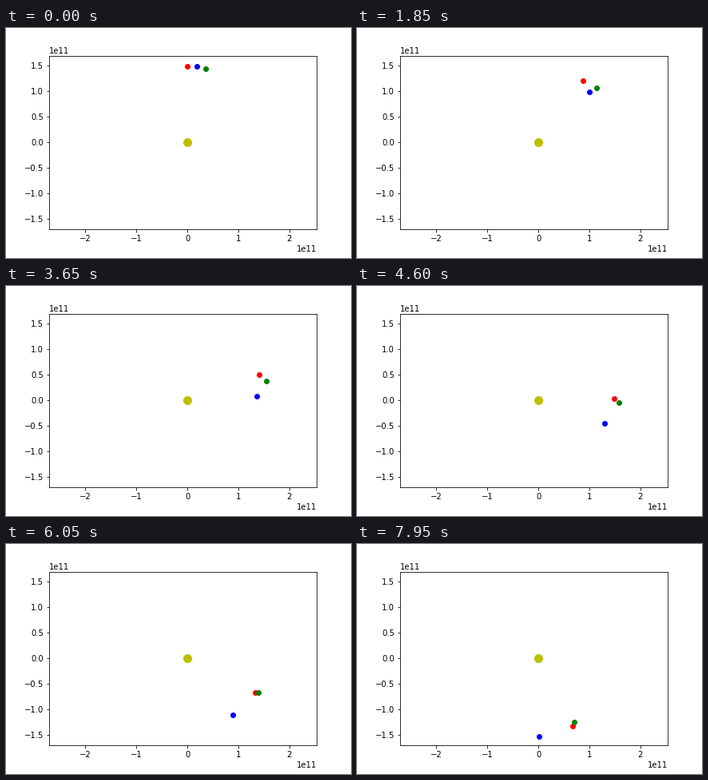
A matplotlib script for the animation above (8 s loop, 432x288 px).

```python
import numpy as np
import matplotlib.pyplot as plt
from matplotlib.animation import FuncAnimation
from matplotlib.ticker import MultipleLocator

plt.rcParams.update({
    "font.family": "DejaVu Sans",
    "font.size": 10,
    "figure.subplot.bottom": 0.125,
})

FRAMES = 160
INTERVAL = 50
UNIT = 1e11  # metres

# colour, semi-major axis, eccentricity, perihelion bearing,
# mean anomaly at the start, degrees per frame
ORBITS = [
    ("r", 1.4965, 0.0, 0.0, 0.28, 0.963),
    ("b", 1.5604, 0.129, 87.7, -66.35, 0.9008),
    ("g", 1.4169, 0.128, 256.0, 104.7, 1.036),
]


def position(frame, a, e, bearing, start, rate):
    """Point on a Kepler ellipse; bearings run clockwise from the top."""
    mean = np.radians(start + rate * frame)
    ecc = mean
    for _ in range(12):
        ecc -= (ecc - e * np.sin(ecc) - mean) / (1 - e * np.cos(ecc))
    along = a * (np.cos(ecc) - e)
    across = a * np.sqrt(1 - e * e) * np.sin(ecc)
    w = np.radians(bearing)
    x = along * np.sin(w) + across * np.cos(w)
    y = along * np.cos(w) - across * np.sin(w)
    return x * UNIT, y * UNIT


fig, ax = plt.subplots(figsize=(6, 4), dpi=72)
ax.set_xlim(-2.712 * UNIT, 2.5357 * UNIT)
ax.set_ylim(-1.707 * UNIT, 1.7012 * UNIT)
ax.xaxis.set_major_locator(MultipleLocator(UNIT))
ax.yaxis.set_major_locator(MultipleLocator(UNIT / 2))

ax.plot([0], [0], "yo", markersize=10)
bodies = [ax.plot([], [], color + "o", markersize=6)[0]
          for color, *_ in ORBITS]


def update(frame):
    for body, (_, *orbit) in zip(bodies, ORBITS):
        x, y = position(frame, *orbit)
        body.set_data([x], [y])
    return bodies


anim = FuncAnimation(fig, update, frames=FRAMES, interval=INTERVAL,
                     init_func=lambda: update(0), repeat=True,
                     repeat_delay=0, blit=False)
plt.show()
```
